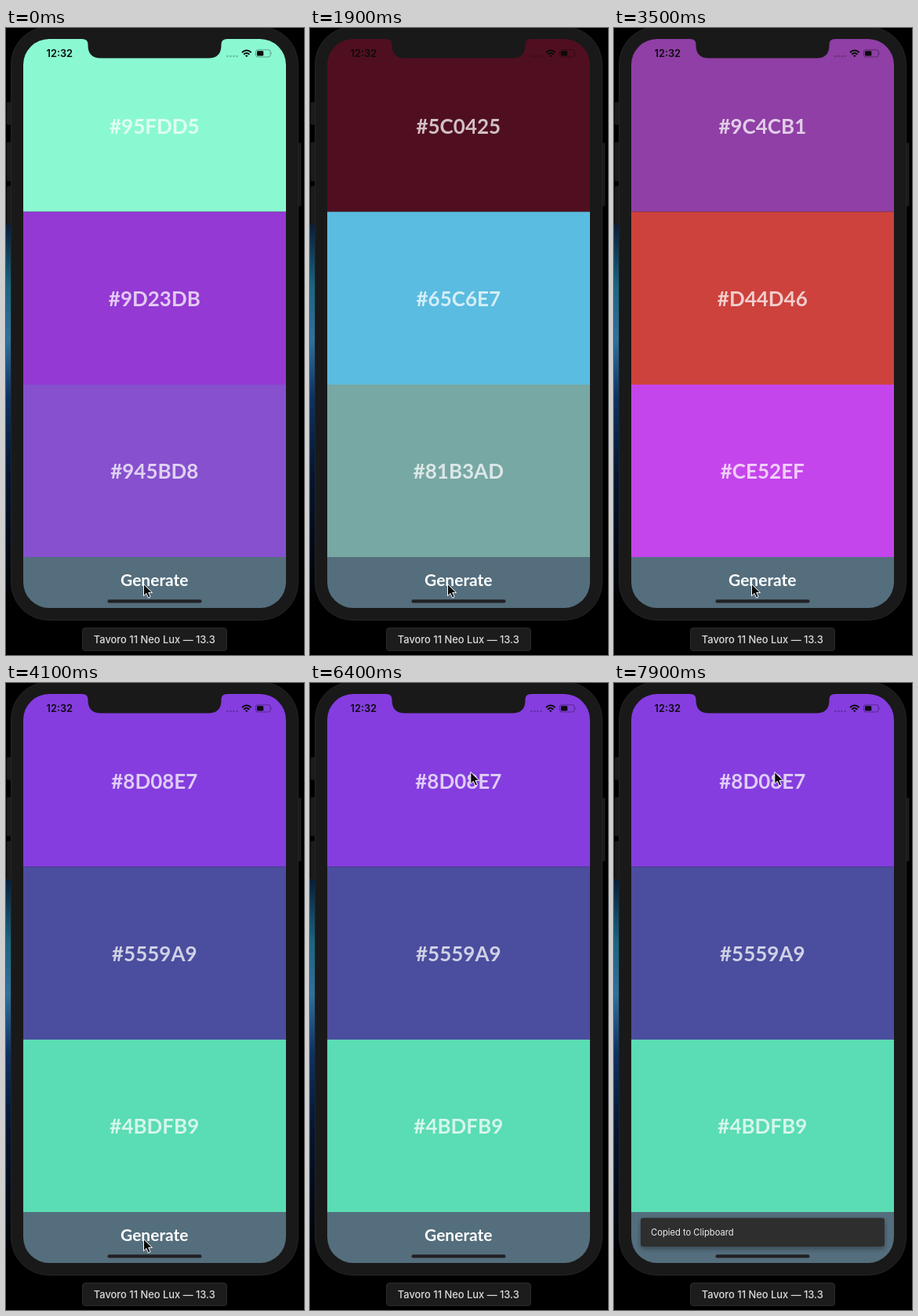
Write an HTML page that moves like this. It is 380x800 px and loops after 8000 ms.

```html
<!DOCTYPE html>
<html lang="en">
<head>
<meta charset="utf-8">
<title>Palette generator</title>
<style>
  html, body { margin: 0; width: 100%; height: 100%; overflow: hidden; background: #000; }
  svg { display: block; width: 100vw; height: 100vh; }
  .hex, .action { font-family: Lato, sans-serif; font-weight: 700; text-anchor: middle; fill: #fff; }
  .hex { font-size: 26px; fill-opacity: .74; }
  .action { font-size: 21px; }
  .ui { font-family: Inter, Roboto, sans-serif; }
</style>
</head>
<body>
<svg viewBox="0 0 380 800">
  <defs>
    <linearGradient id="glow" x2="0" y2="1">
      <stop offset="0" stop-color="#071c38"/>
      <stop offset=".16" stop-color="#1b6480"/>
      <stop offset=".3" stop-color="#2f719f"/>
      <stop offset=".45" stop-color="#0d3262"/>
      <stop offset=".65" stop-color="#051530"/>
      <stop offset="1" stop-color="#000"/>
    </linearGradient>
    <clipPath id="screen"><rect x="22" y="14" width="335" height="726" rx="33"/></clipPath>
    <filter id="shadow" x="-10%" y="-40%" width="120%" height="200%">
      <feDropShadow dx="0" dy="3" stdDeviation="3" flood-opacity=".35"/>
    </filter>
  </defs>

  <rect width="380" height="800"/>
  <rect y="250" width="7" height="490" fill="url(#glow)"/>
  <g fill="#1b1b1b" stroke="#262626" stroke-width=".6">
    <rect x="1.3" y="95" width="6" height="28" rx="1"/>
    <rect x="1.3" y="146" width="6" height="49" rx="1"/>
    <rect x="1.3" y="202" width="6" height="49" rx="1"/>
    <rect x="371" y="147" width="5" height="80" rx="1"/>
  </g>
  <rect x="6.5" y="-1.5" width="366" height="757" rx="48" fill="#191919" stroke="#242424"/>

  <g clip-path="url(#screen)">
    <g id="bands"></g>
    <rect x="22" y="675" width="335" height="65" fill="#546e7d"/>
    <text class="action" x="189.3" y="711.5">Generate</text>
    <g id="snack">
      <rect x="34" y="682.5" width="311" height="36.5" rx="3" fill="#2d2d2d" filter="url(#shadow)"/>
      <text id="message" class="ui" x="47" y="704.7" font-size="11.2" fill="#eee">Copied to Clipboard</text>
    </g>
    <rect x="129.5" y="729.3" width="120" height="4.2" rx="2.1" fill="#202124"/>
  </g>
  <path d="M97 13V14Q104.500 14 104.500 21V22Q104.500 38.500 121 38.500H258Q274.500 38.500 274.500 22V21Q274.500 14 282 14V13Z" fill="#191919"/>

  <text class="ui" x="68.3" y="37" text-anchor="middle" font-size="12.8" font-weight="600" fill="#0b0b0b">12:32</text>
  <g fill="#000" fill-opacity=".25">
    <circle cx="282.5" cy="36" r="1.3"/><circle cx="286.5" cy="36" r="1.3"/>
    <circle cx="290.5" cy="36" r="1.3"/><circle cx="294.500" cy="36" r="1.3"/>
  </g>
  <g fill="none" stroke="#0b0b0b" stroke-width="1.9">
    <path d="M301 31.200Q306.800 25.900 312.600 31.200M303.200 33.700Q306.800 30.400 310.400 33.700"/>
    <path d="M306.800 37.200L305 35.300Q306.800 33.800 308.600 35.300Z" fill="#0b0b0b" stroke="none"/>
  </g>
  <rect x="318.500" y="27.800" width="18.600" height="9.200" rx="2.500" fill="none" stroke="#000" stroke-opacity=".4" stroke-width=".9"/>
  <rect x="320" y="29.300" width="8.300" height="6.200" rx="1.200" fill="#0b0b0b"/>
  <path d="M338.300 30.800Q339.900 32.400 338.300 34Z" fill-opacity=".4"/>

  <rect x="97.500" y="765.500" width="184" height="29" rx="3.500" fill="#1c1c1c" stroke="#2a2a2a"/>
  <text class="ui" x="189.300" y="785" text-anchor="middle" font-size="12.900" font-weight="500" fill="#dcdcdc">Tavoro 11 Neo Lux — 13.3</text>

  <path id="cursor" d="M0 0V15.200L3.500 11.900L6 17.600L8.700 16.400L6.200 10.900H11Z" fill="#080808" stroke="#fff" stroke-width="1" stroke-linejoin="round"/>
</svg>
<script>
const LOOP = 8000, STEP = 100;
const SNACK_START = 6980, SNACK_FADE = 250;

// Each swatch pairs its label with the rendered tone.
const palettes = [
  { at: 0, swatches: [['#95FDD5', '#8af9d2'], ['#9D23DB', '#9439d3'], ['#945BD8', '#8650ce']] },
  { at: 1200, swatches: [['#5C0425', '#500f20'], ['#65C6E7', '#5abce0'], ['#81B3AD', '#78a8a4']] },
  { at: 2300, swatches: [['#BFD7C7', '#b6d0c0'], ['#99938F', '#8f8783'], ['#D83424', '#d02c26']] },
  { at: 3100, swatches: [['#9C4CB1', '#8f3fa5'], ['#D44D46', '#cd423c'], ['#CE52EF', '#c545ec']] },
  { at: 4000, swatches: [['#8D08E7', '#853ddf'], ['#5559A9', '#4b4d9e'], ['#4BDFB9', '#5adcb4']] }
];
const cursorPath = [
  { at: 0, x: 175.5, y: 709.5 },
  { at: 4600, x: 175.5, y: 709.5 },
  { at: 5500, x: 195.5, y: 212.5 },
  { at: 6300, x: 204.8, y: 113.5 }
];

const $ = id => document.getElementById(id);
const clamp = v => Math.min(1, Math.max(0, v));
const ease = p => p * p * (3 - 2 * p);

function add(parent, tag, attrs) {
  const el = document.createElementNS('http://www.w3.org/2000/svg', tag);
  for (const key in attrs) el.setAttribute(key, attrs[key]);
  return parent.appendChild(el);
}

const edges = [14, 234.5, 455, 675];
const bands = [125.5, 346, 566.3].map((mid, i) => ({
  rect: add($('bands'), 'rect', { x: 22, y: edges[i], width: 335, height: edges[i + 1] - edges[i] }),
  text: add($('bands'), 'text', { class: 'hex', x: 189.3, y: mid + 9 })
}));

function cursorAt(t) {
  const next = cursorPath.findIndex(p => p.at > t);
  if (next < 0) return cursorPath[cursorPath.length - 1];
  const a = cursorPath[next - 1], b = cursorPath[next];
  const p = ease((t - a.at) / (b.at - a.at));
  return { x: a.x + (b.x - a.x) * p, y: a.y + (b.y - a.y) * p };
}

function render(time) {
  const t = Math.floor(time % LOOP / STEP) * STEP;
  const { swatches } = palettes.filter(p => p.at <= t).pop();
  bands.forEach(({ rect, text }, i) => {
    const [label, tone] = swatches[i];
    rect.setAttribute('fill', tone);
    text.textContent = label;
  });

  const { x, y } = cursorAt(t);
  $('cursor').setAttribute('transform', `translate(${x} ${y})`);

  const shown = clamp((t - SNACK_START) / SNACK_FADE);
  $('snack').setAttribute('opacity', 1 - (1 - shown) ** 1.5);
  $('message').setAttribute('opacity', clamp((shown - 0.5) * 2));
}

const start = performance.now();
function tick() {
  render(performance.now() - start);
  requestAnimationFrame(tick);
}
tick();
</script>
</body>
</html>
```
